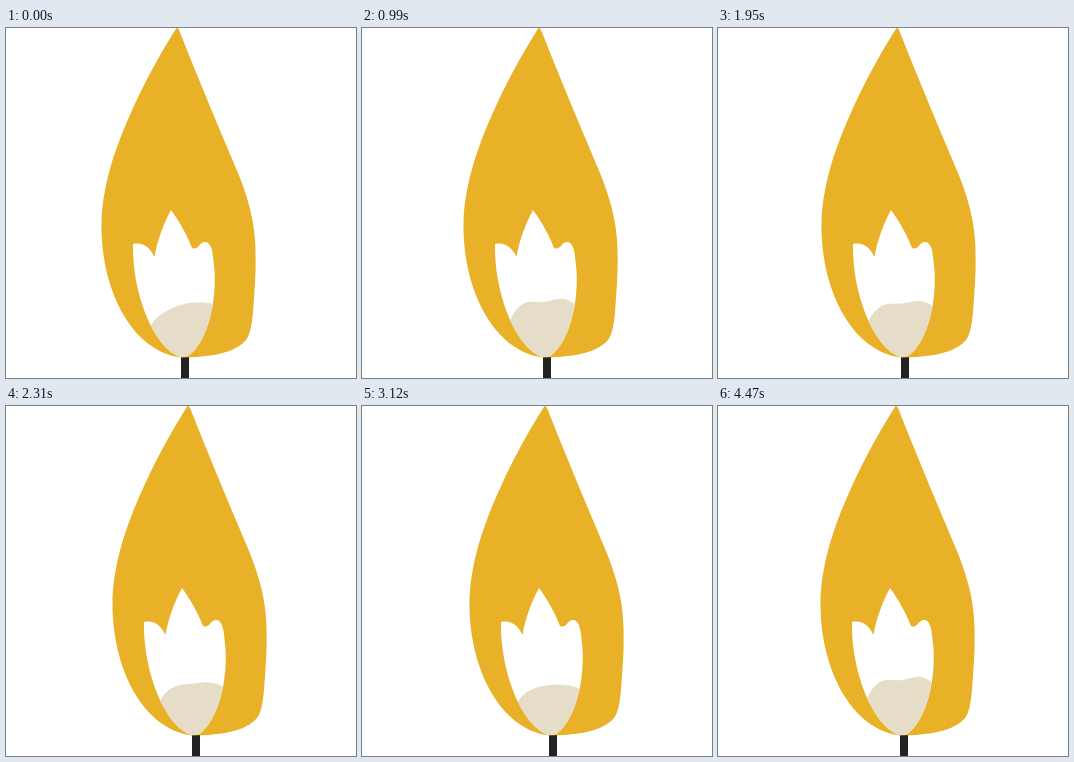
These frames come from a looping animation (350x350 px, 4.5 s). An HTML page with a canvas:

```html
<!DOCTYPE html>
<html lang="en">
<head>
<meta charset="utf-8">
<title>Flame</title>
<style>
  html, body { margin: 0; width: 100%; height: 100%; overflow: hidden; background: #fff; }
  canvas { display: block; }
</style>
</head>
<body>
<canvas id="stage" width="350" height="350"></canvas>
<script>
const ctx = document.getElementById('stage').getContext('2d');
const LOOP = 4500, STEP = 30;

const flame = new Path2D(`M170.5 0 C158 20 142 47 127.5 79 C107.5 122 95 163 95.5 200
  C96 263 126 323 175 329.5 C203 329 228 326 240 312
  C246 305 247 285 248 270 C249 256 250 244 249.5 222
  C249 193 242 170 232 145 C217 109 195 58 173.5 3 Q171.5 -1 170.5 0 Z`);

const core = new Path2D(`M127 216 C138 214 144 220 148.5 229 C151 213 158 195 165 182
  C175 196 181 207 186 220 C193 223 193 213 200 214 C207 216 207 229 208.5 242
  C211 283 197 321 180 329 L174 329 C147 319 126 264 127 216 Z`);

const bump = (t, center, width) => Math.exp(-(((t - center) / width) ** 2));

function ease(t, from, to) {
  const p = Math.min(1, Math.max(0, (t - from) / (to - from)));
  return p * p * (3 - 2 * p);
}

// Whole-pixel sideways drift: quick start, slow wobble, a held lean and one jolt
function sway(t) {
  const rest = 7.5 * ease(t, 0, 150);
  const wobble = 1.2 * Math.sin(t / LOOP * 16 * Math.PI);
  const lean = 4.4 * (ease(t, 1900, 2600) - ease(t, 3850, 4300));
  return Math.round(rest + wobble + lean + 6 * bump(t, 3790, 70));
}

// Height of the pale surface: a dome that settles, tilts and ripples
function surface(x, t) {
  const u = (x - 175) / 35;
  const start = 1 - ease(t, 0, 200);
  const calm = bump(t, 2850, 750);
  const lift = 8 * calm - 3.5 + 5 * start;
  const tilt = 6 * start + 3 * bump(t, 3690, 300);
  const ripple = 2.2 * (1 - calm) * (1 - start) * Math.cos((x - 176) / 21 * Math.PI);
  const dome = 14 * ((x - 182) / 42) ** 2;
  const edge = 10 * Math.exp((140 - x) / 6);
  return 275 + dome + edge + lift - tilt * u + ripple;
}

function draw(now) {
  const t = Math.floor(now % LOOP / STEP) * STEP;
  ctx.fillStyle = '#fff';
  ctx.fillRect(0, 0, 350, 350);
  ctx.save();
  ctx.translate(sway(t), 0);
  ctx.fillStyle = '#222';
  ctx.fillRect(175, 329, 8, 21);
  ctx.fillStyle = '#e8b127';
  ctx.fill(flame);
  ctx.fillStyle = '#fff';
  ctx.fill(core);

  ctx.clip(core);
  ctx.beginPath();
  ctx.moveTo(120, 335);
  for (let x = 130; x <= 215; x++) ctx.lineTo(x, surface(x, t));
  ctx.lineTo(215, 335);
  ctx.fillStyle = '#e5ddc7';
  ctx.fill();
  ctx.restore();
}

const start = performance.now();
(function tick() {
  draw(performance.now() - start);
  requestAnimationFrame(tick);
})();
</script>
</body>
</html>
```
